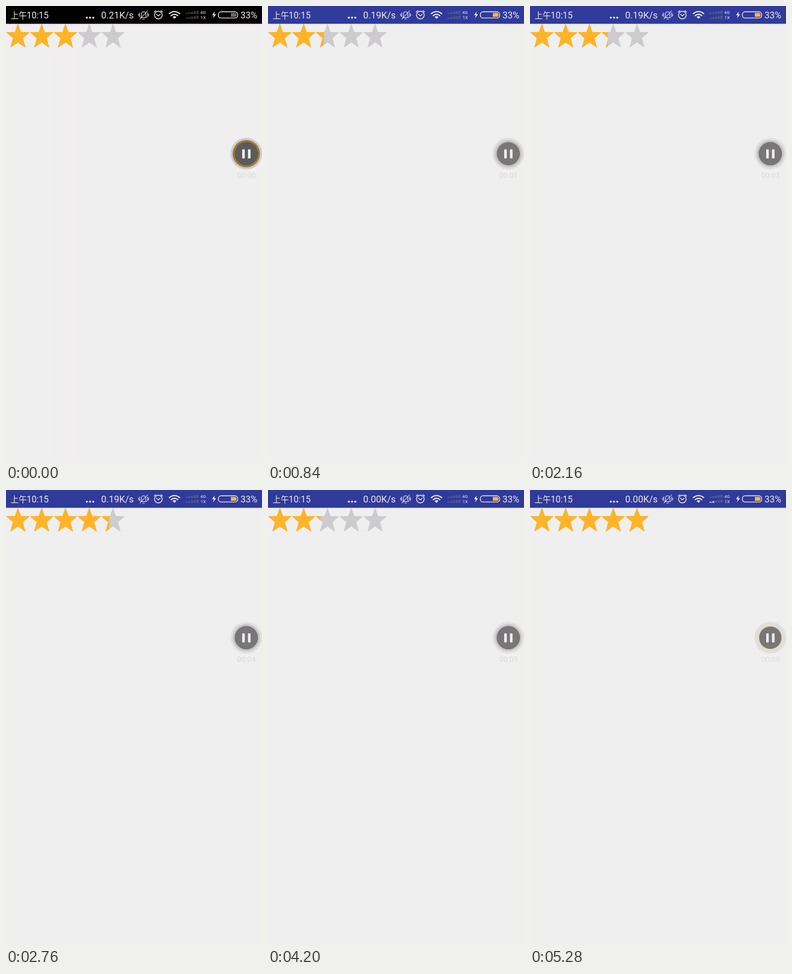
Write an HTML page that moves like this. It is 452 px wide and 804 px high and loops after 5.4 s.

```html
<!DOCTYPE html>
<html lang="zh">
<head>
<meta charset="utf-8">
<title>Rating bar</title>
<style>
  html, body { margin: 0; width: 100%; height: 100%; overflow: hidden; background: #efefef; }
  svg { display: block; width: 452px; height: 804px; }
  text { font-family: Roboto, "Noto Sans CJK SC", "Noto Sans CJK", sans-serif; }
  .bar text { font-size: 16px; fill: #efece4; }
  .line { fill: none; stroke: #ece9e4; stroke-width: 1.4; stroke-linecap: round; stroke-linejoin: round; }
  .solid { fill: #ece9e4; }
  .star { stroke-width: 1; stroke-linejoin: round; }
</style>
</head>
<body>
<svg viewBox="0 0 452 804">
  <defs>
    <path id="star" class="star" d="M21 32.1 26 46.4 40.8 46.7 29.3 56.7 33.7 72.7 21 63.7 8.3 72.7 12.7 56.7 1.2 46.7 16 46.4Z"/>
    <g id="row"></g>
    <clipPath id="clip"><rect id="fill" y="30" height="46"/></clipPath>
  </defs>
  <rect width="452" height="804" fill="#efefef"/>
  <g id="streaks" fill="#f8edf3">
    <rect x="77" y="31" width="2" height="773"/>
    <rect x="117.5" y="31" width="2" height="773"/>
    <rect y="31" width="452" height="6" fill="#f4ecf3"/>
  </g>

  <g class="bar">
    <rect id="status" width="452" height="31.4"/>
    <text x="8" y="21.5" style="font-size:14.5px">上午</text>
    <text x="36.5" y="21.5" style="font-size:15.6px">10:15</text>
    <g class="solid">
      <circle cx="142.7" cy="20.6" r="1.8"/><circle cx="148.4" cy="20.6" r="1.8"/><circle cx="154.1" cy="20.6" r="1.8"/>
    </g>
    <text id="speed" x="225.5" y="22" text-anchor="end" style="font-size:16.4px"></text>

    <g class="line">
      <path d="M238 20.5H248L246.8 18V14C246.8 9 239.2 9 239.2 14V18ZM241.5 23H244.5M236.5 23 250 8.5M236 12V19M234.2 14V17.5M250 12V19M251.8 14V17.5" stroke-width="1.1"/>
      <circle cx="269" cy="16" r="6.8"/>
      <path d="M265.7 14.6 269 17.6 272.3 14.6M261.6 10.6 264.6 8.2M276.4 10.6 273.4 8.2"/>
      <path d="M288.3 13.4Q297.5 6 306.7 13.4M291.6 17Q297.5 12.2 303.4 17" stroke-width="2"/>
    </g>
    <path class="solid" d="M294 19.2Q297.5 16.6 301 19.2L297.5 22.6Z"/>
    <g id="signal"></g>
    <text x="343" y="14" style="font-size:7.8px">4G</text>
    <text x="343.5" y="22.5" style="font-size:7.8px">1X</text>
    <path class="solid" d="M368.5 9.5 363.8 16.3H367L365.5 21.8 371 14.4H367.6Z"/>
    <rect class="line" x="375" y="10.3" width="34" height="10.8" rx="4.6"/>
    <path id="charge" d="M397 12.3H404.5Q407 12.3 407 15.7T404.5 19.1H397Z"/>
    <text x="414" y="21.8">33%</text>
  </g>

  <use href="#row" fill="#cdcbcd" stroke="#cdcbcd"/>
  <use href="#row" fill="#ffb427" stroke="#ffb427" clip-path="url(#clip)"/>

  <g transform="translate(424.3 260.4)">
    <circle id="halo" r="28"/>
    <circle id="ring" r="24.2"/>
    <circle id="disc" r="20.3"/>
    <g fill="#eeeeec">
      <rect x="-7.3" y="-7.6" width="4.6" height="16" rx="1"/>
      <rect x="2.9" y="-7.6" width="4.6" height="16" rx="1"/>
    </g>
  </g>
  <text id="clock" x="424.5" y="303" text-anchor="middle" font-size="13.3"></text>
</svg>
<script>
const LOOP = 5400, STEP = 120, STAR = 42;
const $ = id => document.getElementById(id);

const rating = [[0, 3], [600, 3], [1320, 1.05], [1560, 1.2], [2400, 4.1], [2520, 4.33],
  [2760, 4.33], [3240, 3.24], [3840, 1.95], [4200, 2.2], [4920, 5], [LOOP, 5]];
const speed = [[0, "0.21K/s"], [240, "0.19K/s"], [3000, "0.00K/s"]];
const seconds = [[0, 0], [840, 1], [1320, 2], [1800, 3], [2760, 4], [3960, 5]];
// halo, ring, disc, disc edge
const button = [
  [0, ["#cfcdcf", "#9d7c39", "#5b5c59", "#5b5c59"]],
  [360, ["#cccbcc", "#706650", "#595a57", "#615d52"]],
  [720, ["#dfdddf", "#c9c6c8", "#787678", "#91897c"]],
  [2040, ["#e1e0e1", "#c9c8c9", "#787678", "#7d7a77"]],
  [3000, ["#e1e0e1", "#b9b8b9", "#787678", "#787678"]],
  [3960, ["#e2e0e1", "#cdc9cb", "#787678", "#7d7a77"]],
  [4800, ["#e0dfe0", "#e0dddb", "#787678", "#f3e1a2"]]
];

const held = (keys, t) => keys.filter(k => k[0] <= t).pop()[1];
function between(keys, t) {
  const i = keys.findIndex(k => k[0] > t);
  const [t0, a] = keys[i - 1], [t1, b] = keys[i];
  return a + (b - a) * (t - t0) / (t1 - t0);
}
const set = (id, attrs) => {
  for (const k in attrs) $(id).setAttribute(k, attrs[k]);
};

$("row").innerHTML = [0, 1, 2, 3, 4].map(i => `<use href="#star" x="${i * STAR}"/>`).join("");
$("signal").innerHTML = [14, 22.6].map(base => [0, 1, 2, 3, 4].map(i => {
  const h = 2 + i * 0.9;
  return `<rect x="${317 + i * 4.8}" y="${base - h}" width="3.6" height="${h}"/>`;
}).join("")).join("");
const bars = [...$("signal").children];

function draw(t) {
  const fade = Math.min(1, t / 600);
  const rgb = [48, 58, 155].map(c => Math.round(c * fade));
  set("status", { fill: `rgb(${rgb})` });
  set("streaks", { visibility: t < 240 ? "visible" : "hidden" });
  set("fill", { width: between(rating, t) * STAR });
  set("charge", { fill: t < 720 ? "#6c6a64" : "#ffb62e" });

  const dim = `rgb(${[56, 58, 56].map((c, i) => Math.round(c + [24, 32, 84][i] * fade))})`;
  bars.forEach((b, i) => b.setAttribute("fill", t >= 5280 && (i === 5 || i === 6) ? "#c9c9d4" : dim));

  const [halo, ring, disc, edge] = held(button, t);
  set("halo", { fill: halo });
  set("ring", { fill: ring });
  set("disc", { fill: disc, stroke: edge, "stroke-width": 1 });

  $("speed").textContent = held(speed, t);
  $("clock").textContent = "00:0" + held(seconds, t);
  set("clock", { fill: t < 4800 ? "#d9d8d9" : "#dcdce6" });
}

function tick() {
  draw(Math.floor(performance.now() % LOOP / STEP) * STEP);
  requestAnimationFrame(tick);
}
tick();
</script>
</body>
</html>
```
